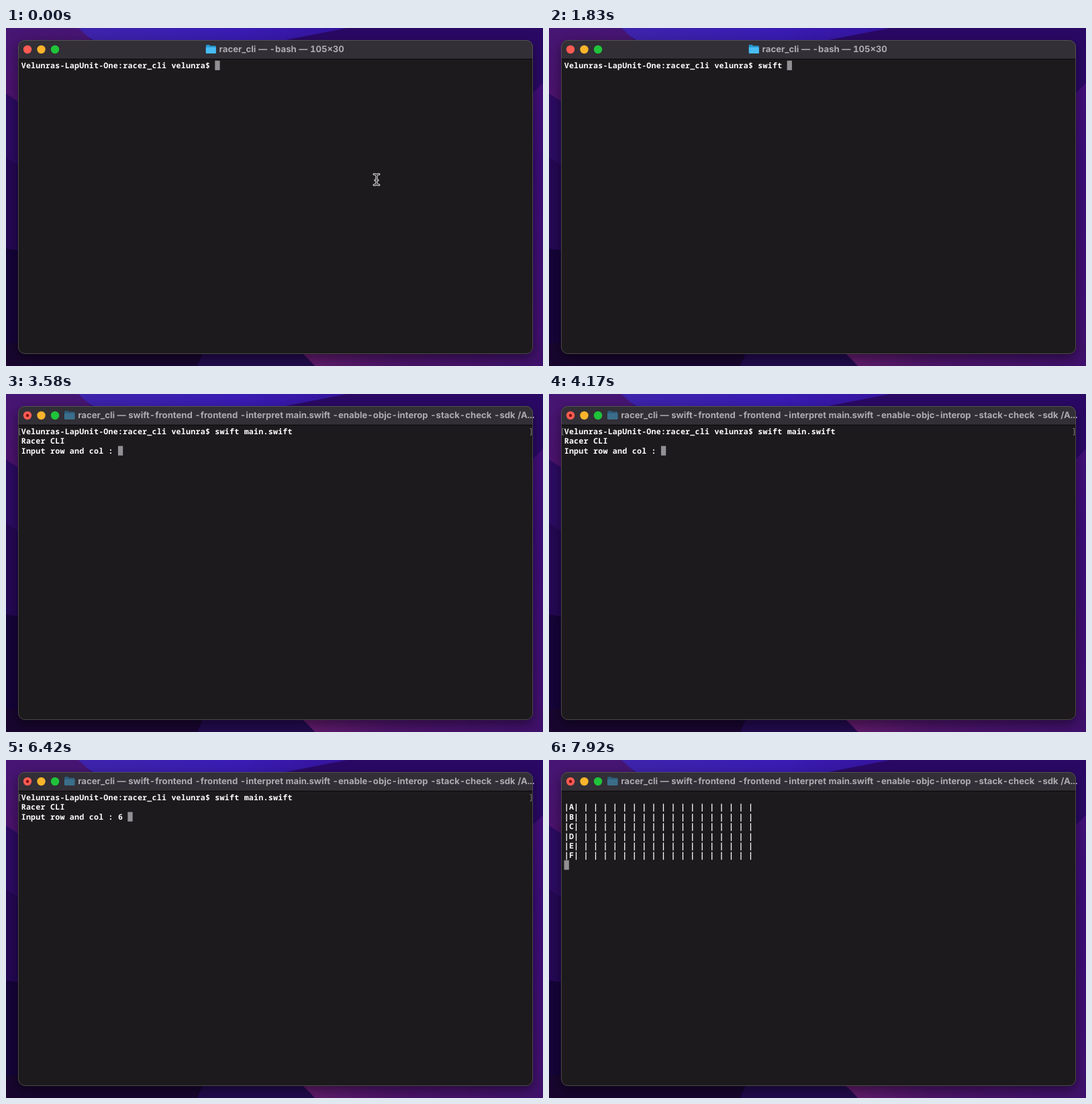
An HTML page for the animation above (8000 ms loop, 800 by 504 pixels).

```html
<!DOCTYPE html>
<html lang="en">
<head>
<meta charset="utf-8">
<title>Terminal session</title>
<style>
  html, body { margin: 0; width: 100%; height: 100%; overflow: hidden; background: #1c0745; }
  svg { display: block; width: 800px; height: 504px; }
  text { white-space: pre; text-rendering: geometricPrecision; }
  .title { font: 700 13.15px Inter, "Open Sans", sans-serif; font-variant-numeric: tabular-nums; fill: #aeabb1; }
  .term text { font: 600 11.6px "Noto Sans Mono", "DejaVu Sans Mono", monospace; letter-spacing: .26px; fill: #fff; }
  .window { filter: drop-shadow(0 6px 9px rgba(0, 0, 0, .45)); }
</style>
</head>
<body>
<svg viewBox="0 0 800 504">
  <defs>
    <linearGradient id="sky"><stop offset="0" stop-color="#3e24ab"/><stop offset=".6" stop-color="#3a1cb4"/><stop offset="1" stop-color="#34149c"/></linearGradient>
    <linearGradient id="ember"><stop offset="0" stop-color="#651d6c"/><stop offset=".4" stop-color="#4c1469"/><stop offset="1" stop-color="#40116c"/></linearGradient>
    <linearGradient id="edge" x2="0" y2="1"><stop offset="0" stop-color="#430f7a"/><stop offset=".3" stop-color="#3b0d78"/><stop offset="1" stop-color="#431070"/></linearGradient>
    <linearGradient id="dusk" x2="0" y2="1"><stop offset="0" stop-color="#461674"/><stop offset="1" stop-color="#4c126b"/></linearGradient>
  </defs>

  <g id="wallpaper">
    <rect width="800" height="504" fill="#2a0965"/>
    <path d="M100 0H508L355 30H150Z" fill="url(#sky)"/>
    <path d="M0 0H108L150 39L30 130L0 98Z" fill="url(#dusk)"/>
    <path d="M0 98L30 117V215L0 193Z" fill="#2c0b62"/>
    <path d="M0 193L30 212V340L0 329Z" fill="#240854"/>
    <path d="M0 329L30 333V504H0Z" fill="#150439"/>
    <path d="M800 82L770 112V504H800Z" fill="url(#edge)"/>
    <path d="M0 470H300L285 504H0Z" fill="#18062f"/>
    <path d="M300 470H430L462 504H285Z" fill="#220b4e"/>
    <path d="M425 470H800V504H460Q450 492 425 470Z" fill="url(#ember)"/>
  </g>

  <g class="window">
    <rect x="18" y="18" width="767" height="468" rx="10" fill="#1c1a1c"/>
    <path d="M18 46V28a10 10 0 0 1 10-10H775a10 10 0 0 1 10 10V46Z" fill="#322f36"/>
    <path d="M18 46.3H785" stroke="#080709"/>
    <rect x="18.5" y="18.5" width="766" height="467" rx="9.5" fill="none" stroke="#77786a" stroke-opacity=".5"/>
  </g>

  <circle cx="32" cy="32" r="6.2" fill="#fd5b52"/>
  <circle cx="52.5" cy="32" r="6.2" fill="#f9b42c"/>
  <circle cx="73" cy="32" r="6.2" fill="#20c43a"/>
  <circle id="busyDot" cx="32" cy="32" r="2.2" fill="#7d0b08"/>

  <g id="heading">
    <path d="M0 26.2q0-1.2 1.2-1.2H5l1.6 1.6H13.8q1.2 0 1.2 1.2V36.8q0 1.2-1.2 1.2H1.2Q0 38 0 36.8Z" fill="#2496cf"/>
    <path d="M0 28.7H15V36.8q0 1.2-1.2 1.2H1.2Q0 38 0 36.8Z" fill="#47bdf3"/>
    <rect id="folderShade" y="24" width="16" height="15" fill="#322f36" opacity=".55"/>
    <text id="heading-text" class="title" x="19.8" y="36.3"></text>
  </g>

  <g class="term">
    <path id="marks" d="M21.8 51.5H19.8V61H21.8M780.7 51.5H782.7V61H780.7" fill="none" stroke="#858387"/>
    <rect id="cursor" width="7.3" height="14.2" fill="#929094"/>
    <g id="rows"></g>
  </g>

  <g id="ibeam" fill="none" stroke-linecap="round" stroke-linejoin="round">
    <defs><path id="beam" d="M548.2 218q3.2 0 3.8 2q.6-2 3.8-2M552 220V232M550 227H554M548.2 234q3.2 0 3.8-2q.6 2 3.8 2"/></defs>
    <use href="#beam" stroke="#f2f2f2" stroke-width="3.2"/>
    <use href="#beam" stroke="#111" stroke-width="1.1"/>
  </g>
</svg>
<script>
  const LOOP = 8000, CELL = 7.22, LINE = 14.4, LEFT = 22.7, TOP = 48.7;
  const PROMPT = 'Velunras-LapUnit-One:racer_cli velunra$ ';
  const QUESTION = 'Input row and col : ';
  const COMMAND = [[0, ''], [830, 's'], [960, 'sw'], [1090, 'swi'], [1250, 'swif'], [1420, 'swift'],
    [1590, 'swift '], [2000, 'swift m'], [2160, 'swift ma'], [2420, 'swift main.swift ']];
  const ANSWER = [[0, ''], [5920, '6'], [6170, '6 '], [6670, '6 1'], [6920, '6 18']];
  const AT = { pointerHidden: 830, enter: 2920, moved: 3080, busy: 3170, output: 3500, track: 7420 };

  const el = id => document.getElementById(id);
  const show = (id, on) => el(id).setAttribute('visibility', on ? 'visible' : 'hidden');
  const latest = (steps, t) => steps.filter(([start]) => start <= t).pop()[1];

  const track = ['', ...[...'ABCDEF'].map(name => `|${name}|` + ' |'.repeat(18)), ''];

  const rows = track.map((_, i) => {
    const row = document.createElementNS('http://www.w3.org/2000/svg', 'text');
    row.setAttribute('x', LEFT);
    row.setAttribute('y', TOP + 11.3 + i * LINE);
    return el('rows').appendChild(row);
  });

  function screenAt(t) {
    if (t >= AT.track) return track;
    const lines = [PROMPT + latest(COMMAND, t)];
    if (t >= AT.output) lines.push('Racer CLI', QUESTION + latest(ANSWER, t));
    else if (t >= AT.moved) lines.push('');
    return lines;
  }

  function render(t) {
    const lines = screenAt(t), last = lines.length - 1, busy = t >= AT.busy;
    rows.forEach((row, i) => {
      const line = lines[i] || '';
      if (row.textContent !== line) row.textContent = line;
    });
    el('cursor').setAttribute('x', LEFT - .2 + lines[last].length * CELL);
    el('cursor').setAttribute('y', TOP + last * LINE);
    el('heading').setAttribute('transform', `translate(${busy ? 87.4 : 297.8} 0)`);
    el('heading-text').textContent = 'racer_cli — ' + (busy
      ? 'swift-frontend -frontend -interpret main.swift -enable-objc-interop -stack-check -sdk /A...'
      : '-bash — 105×30');
    show('folderShade', busy);
    show('busyDot', busy);
    show('marks', t >= AT.enter && t < AT.track);
    show('ibeam', t < AT.pointerHidden);
  }

  const start = performance.now();
  function tick() {
    render((performance.now() - start) % LOOP);
    requestAnimationFrame(tick);
  }
  tick();
</script>
</body>
</html>
```
